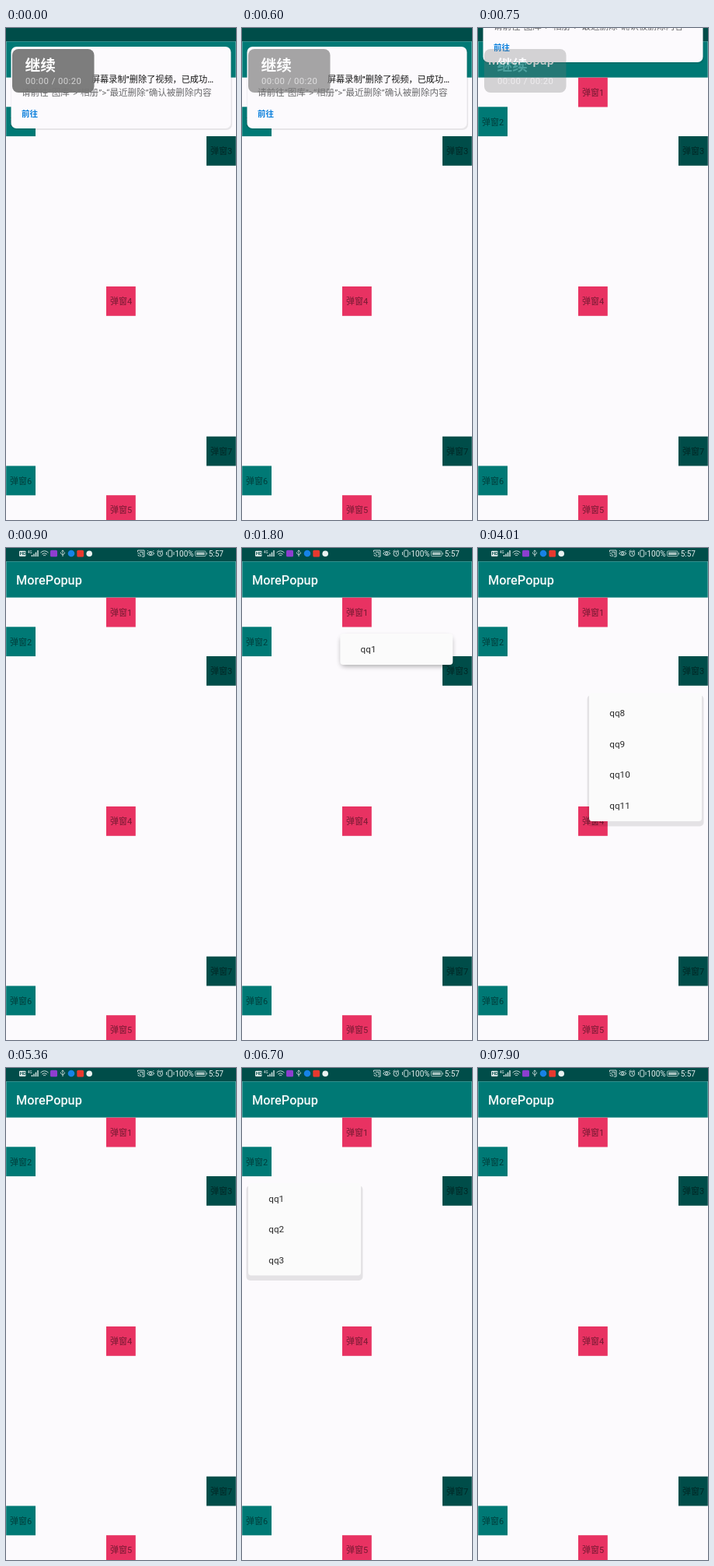
These frames come from a looping animation (296 by 632 pixels, 8 s). An HTML page:

```html
<!DOCTYPE html>
<html lang="zh-CN">
<head>
<meta charset="utf-8">
<title>MorePopup</title>
<style>
  html, body { margin: 0; width: 100%; height: 100%; overflow: hidden; background: #fcfafd; }
  svg { display: block; width: 296px; height: 632px; }
  text { font-family: Roboto, "Noto Sans CJK SC", "Noto Sans CJK", sans-serif; }
</style>
</head>
<body>
<svg id="stage" viewBox="0 0 296 632">
  <defs>
    <filter id="soft" x="-20%" y="-30%" width="140%" height="170%"><feGaussianBlur stdDeviation="3"/></filter>
    <filter id="crisp"><feGaussianBlur stdDeviation=".7"/></filter>
  </defs>
  <rect width="296" height="632" fill="#fcfafd"/>
  <rect width="296" height="17.3" fill="#004d49"/>
  <rect x=".3" y="17.3" width="295.4" height="46.3" fill="#007975"/>
  <text x="13" y="47" font-size="16.3" font-weight="500" fill="#f4f9f9">MorePopup</text>

  <g id="status" fill="none" stroke="#dfeae9" stroke-width=".9">
    <rect x="17" y="3.7" width="8.5" height="7" rx="1" fill="#e9f2f1" stroke="none"/>
    <text x="17.7" y="9.4" font-size="6" font-weight="700" fill="#004d49" stroke="none">HD</text>
    <text x="28" y="6.5" font-size="4.5" fill="#fff" stroke="none">4G</text>
    <path d="M33.5 11V9M36 11V7.5M38.5 11V5.5M41 11V3" stroke-width="1.4"/>
    <path d="M44.5 6q5-4.5 10 0M46.3 8q3.2-2.8 6.4 0M48 9.8q1.5-1.2 3 0"/>
    <rect x="57" y="2.8" width="9" height="8.5" rx="1.5" fill="#8d3fd0" stroke="none"/>
    <path d="M73 11V3M71.5 4.5 73 2.8 74.5 4.5M70.5 5.5V7L73 9 75.5 7V5.5" stroke-width=".8"/>
    <circle cx="84" cy="7" r="4.3" fill="#1683e6" stroke="none"/>
    <rect x="91.3" y="2.8" width="8.7" height="8.7" rx="1.5" fill="#e8392f" stroke="none"/>
    <circle cx="107.2" cy="7.3" r="3.8" fill="#e9f2f1" stroke="none"/>
    <path d="M169.5 5V3h8.5v8h-3M169.5 6.5q4 0 4 4.5M169.5 9q2 0 2 2M172 5.2h4v4"/>
    <path d="M181.5 7q4.7-5 9.4 0q-4.7 5-9.4 0ZM183 4 182 3M189.4 4l1-1"/>
    <circle cx="186.2" cy="7" r="1.5"/>
    <circle cx="198.3" cy="7.3" r="3.3"/>
    <path d="M198.3 5.3v2.2l1.5 1M194.5 4.5l2-1.8M202 4.5l-2-1.8"/>
    <rect x="208.7" y="3" width="5" height="8" rx="1"/>
    <path d="M206.5 5v4M216 5v4"/>
    <rect x="243.5" y="4" width="13.5" height="6.5" rx="1" stroke="#a9c4c1"/>
    <path d="M258.5 6v2.5" stroke="#a9c4c1"/>
    <rect x="245" y="5.5" width="10.5" height="3.5" fill="#a9c4c1" stroke="none"/>
    <g font-size="10" fill="#e6efee" stroke="none">
      <text x="217.5" y="10.8">100%</text>
      <text x="260.7" y="10.8">5:57</text>
    </g>
  </g>

  <g id="buttons"></g>
  <g id="popups"></g>

  <g id="card">
    <rect x="6" y="25" width="285" height="106" rx="7" fill="#000" opacity=".08" filter="url(#crisp)"/>
    <rect x="6.5" y="24" width="283" height="105" rx="7" fill="#fcfafd"/>
    <text x="267" y="69.5" font-size="11.15" font-weight="500" text-anchor="end" fill="#161616">屏幕录制”删除了视频，已成功…</text>
    <text x="20" y="87" font-size="11.55" fill="#6b6b6d">请前往“图库”&gt;“相册”&gt;“最近删除”确认被删除内容</text>
    <text x="20" y="114.3" font-size="10.5" font-weight="700" fill="#0a7fdc">前往</text>
  </g>
  <g id="toast">
    <rect x="8" y="27" width="105.5" height="56" rx="8" fill="#777"/>
    <text x="24.5" y="54.6" font-size="19.7" font-weight="700" fill="#fff">继续</text>
    <text x="25" y="72.3" font-size="11.3" letter-spacing=".45" fill="#d2d2d2">00:00 / 00:20</text>
  </g>
</svg>
<script>
const LOOP = 8000, ROW = 39.5, WIDTH = 145;
const $ = id => document.getElementById(id);
const PINK = '#e83262', TEAL = '#007975', DARK = '#004d49';

function add(parent, tag, attrs, text) {
  const node = document.createElementNS('http://www.w3.org/2000/svg', tag);
  for (const key in attrs) node.setAttribute(key, attrs[key]);
  if (text) node.textContent = text;
  return parent.appendChild(node);
}

const buttons = [
  [129, 63.7, PINK], [0.2, 101.3, TEAL], [258, 139, DARK], [129, 332, PINK],
  [129, 600.2, PINK], [0.2, 562.5, TEAL], [258, 524.7, DARK]
];
buttons.forEach(([x, y, fill], i) => {
  add($('buttons'), 'rect', { x, y, width: 37.8, height: 37.8, fill });
  add($('buttons'), 'text', {
    x: x + 19, y: y + 23.2, 'font-size': 11, 'text-anchor': 'middle', fill: '#000', opacity: .5
  }, '弹窗' + (i + 1));
});

// A popup list clipped to its panel; returns the panel and its scrolling content.
function makePopup(name, x, y, height, count, soft) {
  const panel = add($('popups'), 'g', {});
  const shadow = soft
    ? { x: x + 1, y: y + 4, width: WIDTH - 2, height: height - 2, opacity: .32, filter: 'url(#soft)' }
    : { x: x - 2.5, y: y + 3, width: WIDTH + 5, height: height + 3.5, opacity: .09, filter: 'url(#crisp)' };
  add(panel, 'rect', { ...shadow, rx: 5, fill: '#000' });
  add(panel, 'rect', { x, y, width: WIDTH, height, rx: 4, fill: '#fbfbfb' });
  const clip = add(panel, 'clipPath', { id: name });
  add(clip, 'rect', { x, y, width: WIDTH, height });
  const list = add(add(panel, 'g', { 'clip-path': `url(#${name})` }), 'g', {});
  for (let i = 0; i < count; i++) {
    const top = y + i * ROW;
    add(list, 'text', { x: x + 26.3, y: top + 23.6, 'font-size': 11.7, fill: '#2b2b2b' }, 'qq' + (i + 1));
    if (i === 3) add(list, 'path', { d: `M${x + 13} ${top + 38.5}h117`, stroke: '#ececec' });
  }
  return { panel, list };
}

const first = makePopup('first', 126.3, 110, 40, 1, true);
const second = makePopup('second', 143, 186, 165, 11);
const third = makePopup('third', 8, 148, 118.5, 3);

const show = (node, on) => node.setAttribute('display', on ? 'inline' : 'none');
const shift = (node, y) => node.setAttribute('transform', `translate(0 ${y})`);

// Value of the last [start, value] step that has begun.
const step = (t, steps) => steps.reduce((value, [start, next]) => t >= start ? next : value, 0);

const toastFade = [[0, .95], [600, .65], [750, .3], [900, 0]];
const scroll = [[3720, 150], [3870, 265.5], [4010, 270], [4760, 42], [4910, 0]];

function draw(t) {
  show($('status'), t >= 750);
  show($('card'), t < 900);
  shift($('card'), t < 750 ? 0 : -85);
  $('toast').setAttribute('opacity', step(t, toastFade));
  show(first.panel, t >= 1800 && t < 2540);
  show(second.panel, t >= 3130 && t < 5360);
  show(third.panel, t >= 6100 && t < 7900);
  shift(second.list, -step(t, scroll));
}

const begin = performance.now();
function tick() {
  draw((performance.now() - begin) % LOOP);
  requestAnimationFrame(tick);
}
tick();
</script>
</body>
</html>
```
